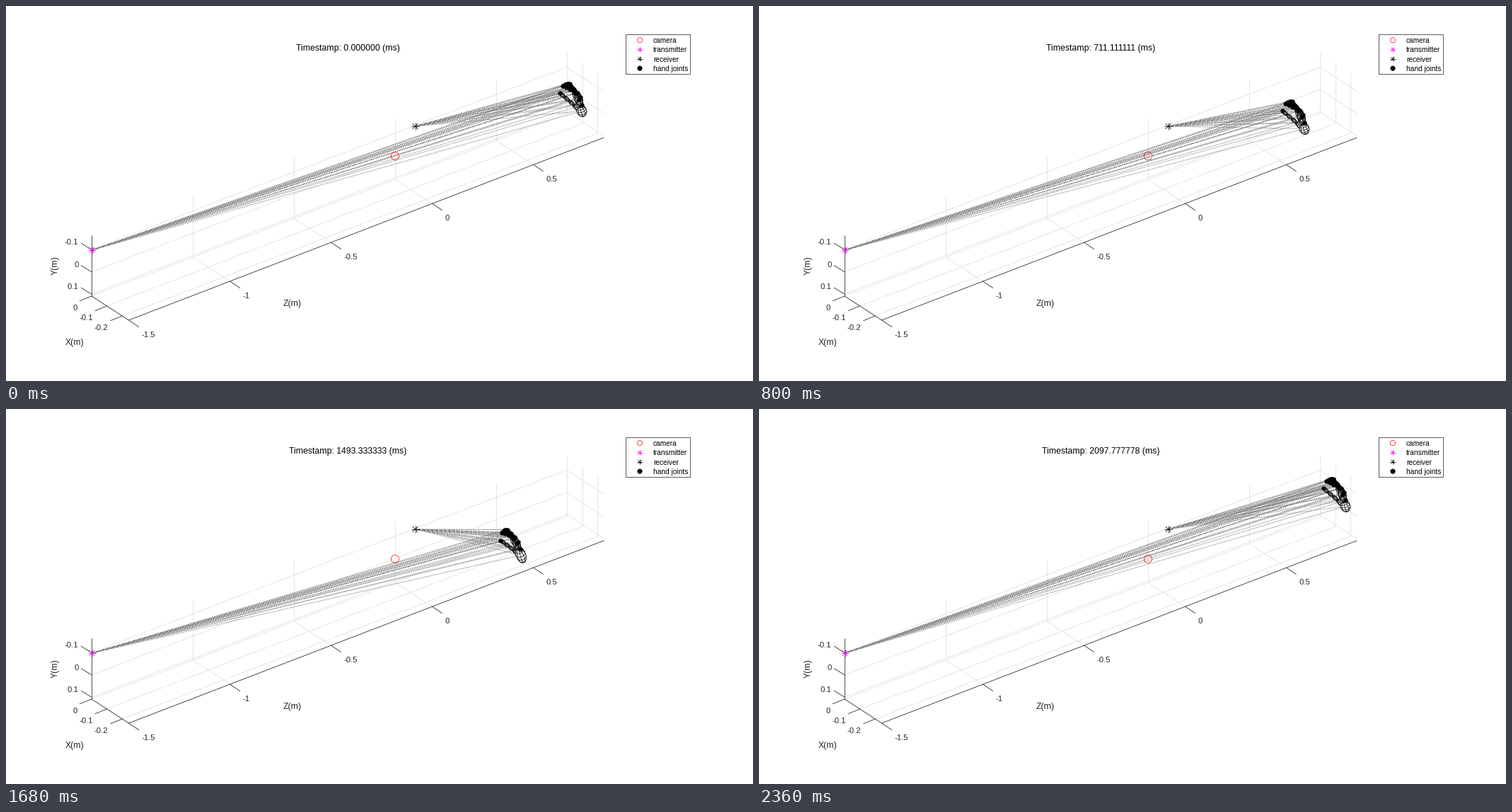
A matplotlib script that plays this animation: 1056 by 530 pixels, repeating every 2.4 s.

```python
import numpy as np
import matplotlib.pyplot as plt
from matplotlib.animation import FuncAnimation
from matplotlib.collections import LineCollection, PolyCollection
from matplotlib.patches import Circle, Rectangle

W, H, DPI = 1056, 530, 100
PT = 72 / DPI
FRAMES, INTERVAL = 60, 40
MS_PER_FRAME = 320 / 9
INK, GRID = "#262626", "#dfdfdf"

plt.rcParams["font.family"] = "Liberation Sans"
fig = plt.figure(figsize=(W / DPI, H / DPI), dpi=DPI, facecolor="white")
ax = fig.add_axes([0, 0, 1, 1])
ax.set_xlim(0, W)
ax.set_ylim(H, 0)
ax.axis("off")

# Axis box in screen space: origin plus one vector per axis.
ORIGIN = np.array([121, 410.0])
DEPTH = np.array([671.8, -258.0])
SIDE = np.array([52.5, 34.0])
UP = np.array([0, -86.0])
Z_STEP = np.array([142.9, -55.0])
X_STEP = np.array([21.7, 14.0])
Y_STEP = np.array([0, 31.4])
Y_TOP = np.array([0, -65.5])


def lines(segments, color, width, z):
    ax.add_collection(LineCollection(segments, colors=color,
                                     linewidths=width * PT, zorder=z))


def label(x, y, text, size, ha="left", color=INK):
    return ax.text(x, y, text, fontsize=size * PT, ha=ha, va="baseline",
                   color=color, zorder=9)


def star(x, y, r, color):
    d = r * 0.7
    arms = [(r, 0), (0, r), (d, d), (d, -d)]
    lines([[(x - a, y - b), (x + a, y + b)] for a, b in arms], color, 0.75, 8)


def ring(x, y, r, **kw):
    ax.add_patch(Circle((x, y), r, lw=0.7 * PT, zorder=8, **kw))


def draw_axes():
    grid = []
    for k in range(1, 5):
        p = ORIGIN + k * Z_STEP
        grid += [(p, p + UP), (p, p + SIDE)]
    for k in range(3):
        p = ORIGIN + k * X_STEP
        grid += [(p, p + DEPTH), (p + DEPTH, p + DEPTH + UP)]
        p = ORIGIN + Y_TOP + k * Y_STEP
        grid += [(p, p + DEPTH), (p + DEPTH, p + DEPTH + SIDE)]
    lines(grid, GRID, 0.75, 1)

    corner = ORIGIN + SIDE
    dark = [(ORIGIN, ORIGIN + UP), (ORIGIN, corner), (corner, corner + DEPTH)]

    def ticks(start, step, names, tick, offset, ha):
        for k, name in enumerate(names):
            p = start + k * step
            dark.append((p, p + tick))
            label(*(p + offset), name, 11.2, ha)

    ticks(corner, Z_STEP, ("-1.5", "-1", "-0.5", "0", "0.5"),
          (14.5, 9.7), (18.4, 24), "left")
    ticks(ORIGIN, X_STEP, ("0", "-0.1", "-0.2"),
          (-17, 6.8), (-20, 19.5), "right")
    ticks(ORIGIN + Y_TOP, Y_STEP, ("-0.1", "0", "0.1"),
          (-15, -9.3), (-18.5, -7.2), "right")
    lines(dark, INK, 0.8, 2)

    label(97, 479.5, "X(m)", 12.2, "center")
    label(405, 424, "Z(m)", 12.2, "center")
    ax.text(70, 367, "Y(m)", fontsize=12.2 * PT, color=INK, rotation=90,
            ha="center", va="center")


def draw_legend():
    ax.add_patch(Rectangle((876, 40), 91, 56, fc="white", ec=INK,
                           lw=0.75 * PT, zorder=7))
    names = ("camera", "transmitter", "receiver", "hand joints")
    rows = [48.2 + 13.3 * k for k in range(4)]
    for y, name in zip(rows, names):
        label(915, y + 3.8, name, 10.1, color="black")
    ring(896, rows[0], 3.6, fc="none", ec="red")
    star(896, rows[1], 3.6, "magenta")
    star(896, rows[2], 3.6, "black")
    ring(896, rows[3], 3.2, fc="black", ec="black")


TRANSMITTER, RECEIVER, CAMERA = (121.5, 345), (578.5, 170), (550, 212)
draw_axes()
draw_legend()
star(*TRANSMITTER, 5.4, "magenta")
star(*RECEIVER, 5.4, "black")
ring(*CAMERA, 5.6, fc="none", ec="red")
title = label(483.5, 63.3, "", 12.3, "center", "black")

# Path of the first fingertip: frame -> screen point.
PATH = {0: (787, 113), 14: (770, 119), 26: (717, 160), 34: (697, 182),
        42: (701, 175), 50: (738, 136), 56: (787, 112), 59: (802, 102)}
TIMES = np.array(list(PATH), float)
POINTS = np.array(list(PATH.values()), float)
SLOPES = np.gradient(POINTS, TIMES, axis=0, edge_order=2)


def fingertip(t):
    """Cubic Hermite interpolation along the path."""
    i = min(np.searchsorted(TIMES, t, side="right") - 1, len(TIMES) - 2)
    h = TIMES[i + 1] - TIMES[i]
    s = (t - TIMES[i]) / h
    ease = s * s * (3 - 2 * s)
    return (POINTS[i] * (1 - ease) + POINTS[i + 1] * ease
            + h * s * (1 - s) * (SLOPES[i] * (1 - s) - SLOPES[i + 1] * s))


def rest_fingers():
    """Four bowed fingers of four joints, relative to the first fingertip."""
    k = np.arange(4)[:, None, None]
    s = np.linspace(0, 1, 4)[None, :, None]
    tips = k * np.array([5.5, 2.5])
    knuckles = np.array([14, 3]) + k / 3 * np.array([14, 23])
    bow = 4 * s * (1 - s) * np.array([2.5, -3.5])
    return tips + s * (knuckles - tips) + bow


FINGERS = rest_fingers()
THUMB = np.linspace((-5, 8), (15, 24), 4)
WRIST = np.array([27, 33.0])
REST_INV = np.linalg.inv(np.column_stack([THUMB[0], WRIST]))


def sphere_quads(rings=7, sectors=9, tilt=0.45):
    """Projected unit-sphere mesh, sorted back to front."""
    theta, phi = np.meshgrid(np.linspace(0, np.pi, rings + 1),
                             np.linspace(0, 2 * np.pi, sectors + 1),
                             indexing="ij")
    a = np.cos(theta)
    b, c = np.sin(theta) * np.cos(phi), np.sin(theta) * np.sin(phi)
    pts = np.stack([a * np.cos(tilt) + c * np.sin(tilt), b,
                    c * np.cos(tilt) - a * np.sin(tilt)], axis=-1)
    quads = np.stack([pts[:-1, :-1], pts[1:, :-1], pts[1:, 1:], pts[:-1, 1:]],
                     axis=2).reshape(-1, 4, 3)
    order = np.argsort(quads[..., 2].mean(axis=1))
    return quads[order][..., :2]


SPHERE = sphere_quads()


def ellipsoid(center, half, width):
    side = np.array([-half[1], half[0]]) / np.hypot(*half) * width
    return center + SPHERE[..., :1] * half + SPHERE[..., 1:] * side


def bone(p, q, width):
    return ellipsoid((p + q) / 2, (q - p) / 2 * 1.1, width)


# Opaque grey dots keep overlapping rays from building up to black.
rays = LineCollection([], colors="#777777", linewidths=PT,
                      linestyles=[(0, (1.2, 1.2))], capstyle="butt", zorder=3)
mesh = PolyCollection([], facecolors="white", edgecolors="black",
                      linewidths=0.55 * PT, zorder=4)
ax.add_collection(rays)
ax.add_collection(mesh)
dots, = ax.plot([], [], "o", color="black", ms=6.4 * PT, mew=0, zorder=5)


def update(n):
    tip = fingertip(n)
    curl = np.exp(-((n - 37) / 6) ** 2)
    thumb_vec = np.array([-4 + 5 * curl, 10 + 1.5 * curl])
    wrist_vec = np.array([27, 35.5 - 8 * curl])
    bend = np.column_stack([thumb_vec, wrist_vec]) @ REST_INV
    fingers = tip + FINGERS @ bend.T
    thumb = tip + THUMB @ bend.T
    wrist = tip + wrist_vec

    parts = [bone(wrist, finger[-1], 3.5) for finger in fingers]
    parts.append(bone(thumb[-1], wrist, 4))
    parts += [bone(p, q, 2.6) for p, q in zip(thumb, thumb[1:])]
    parts += [bone(p, q, 2.3) for f in fingers for p, q in zip(f, f[1:])]
    parts.append(ellipsoid(wrist, (8 + 7 * curl) * np.array([0.33, 0.944]), 7))
    mesh.set_verts(np.concatenate(parts))

    joints = fingers.reshape(-1, 2)
    dots.set_data(*np.vstack([joints, thumb[:1]]).T)
    targets = np.vstack([joints, thumb, wrist])
    rays.set_segments([(src, p) for src in (TRANSMITTER, RECEIVER)
                       for p in targets])
    title.set_text(f"Timestamp: {n * MS_PER_FRAME:.6f} (ms)")
    return rays, mesh, dots, title


anim = FuncAnimation(fig, update, frames=FRAMES, interval=INTERVAL,
                     repeat=True, repeat_delay=0, blit=False)
plt.show()
```
